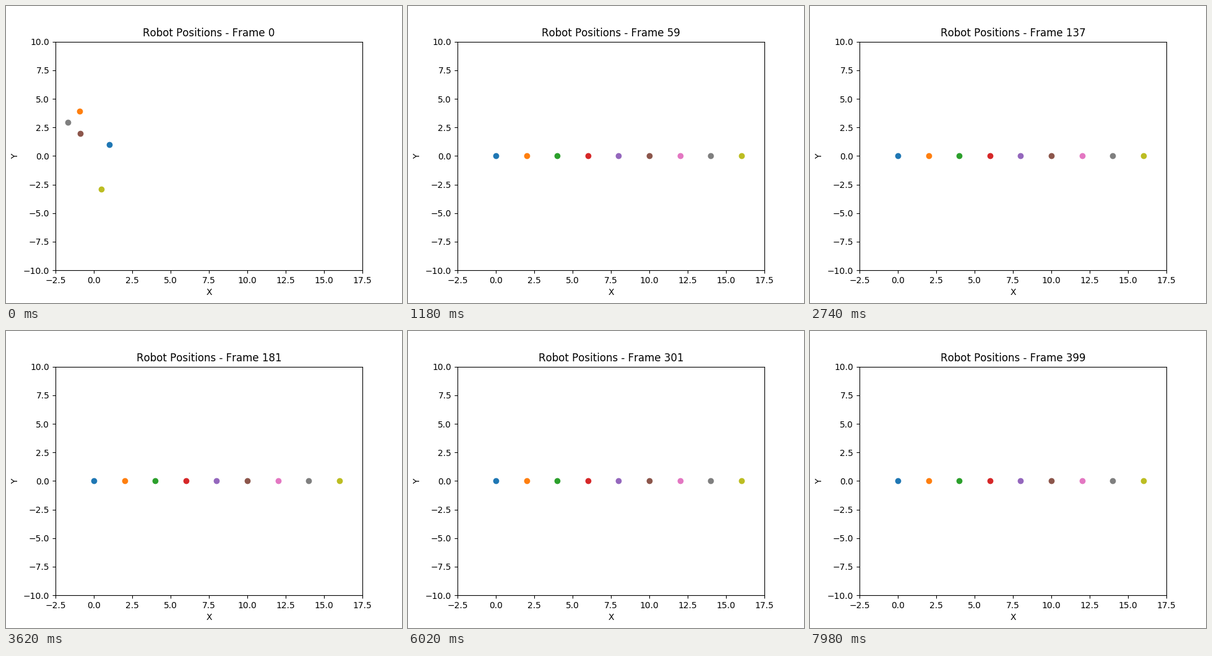
Write a matplotlib script that moves like this. It is 640 by 480 pixels and loops after 8000 ms.

```python
import numpy as np
import matplotlib.pyplot as plt
from matplotlib.animation import FuncAnimation

FRAMES = 400
INTERVAL = 20
ROBOTS = 9
DECAY = 0.8205  # share of the remaining distance kept after each step

plt.rcParams["text.kerning_factor"] = 6

# The robots settle on a line, two units apart
index = np.arange(ROBOTS)
goal = np.column_stack([2.0 * index, 0.0 * index])

# They start on a slanted line left of the axes, apart from those already inside
start = np.column_stack([-1.9 - 0.5 * index, 3.1 - 1.35 * index])
inside = {0: (1, 1), 1: (-0.93, 3.92), 5: (-0.89, 1.97),
          7: (-1.69, 2.94), 8: (0.48, -2.9)}
for i, point in inside.items():
    start[i] = point

fig, ax = plt.subplots(figsize=(6.4, 4.8), dpi=100)
ax.set(xlim=(-2.5, 17.5), ylim=(-10, 10), xlabel="X", ylabel="Y")
title = ax.set_title("", y=1.0)
dots = [ax.plot([], [], "o")[0] for _ in index]


def update(frame):
    points = goal + (start - goal) * DECAY ** frame
    for dot, (x, y) in zip(dots, points):
        dot.set_data([x], [y])
    title.set_text(f"Robot Positions - Frame {frame}")
    return [*dots, title]


anim = FuncAnimation(fig, update, frames=FRAMES, interval=INTERVAL,
                     repeat=True, repeat_delay=0)
plt.show()
```
